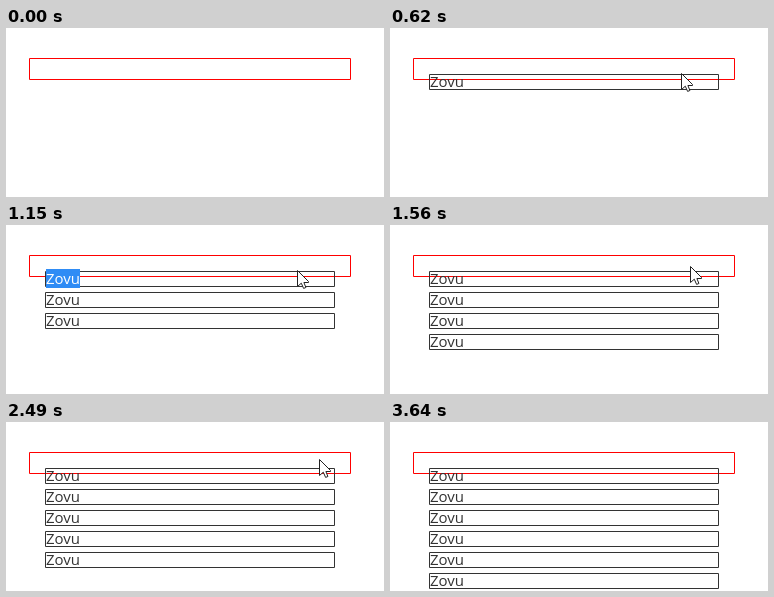
These frames come from a looping animation (378x169 px, 3870 ms). An HTML page with a canvas:

```html
<!DOCTYPE html>
<html lang="en">
<head>
<meta charset="utf-8">
<title>Click to add items</title>
<style>
  html, body { margin: 0; width: 100%; height: 100%; overflow: hidden; background: #fff; }
  canvas { display: block; }
</style>
</head>
<body>
<canvas id="stage" width="378" height="169"></canvas>
<script>
const ctx = document.getElementById('stage').getContext('2d');
const LOOP = 3870;
const POINTER_STEP = 75;
const LABEL = 'Zovu';
const INK = '#333';

// Each click adds an item; the second press also selects the first label.
const clickTimes = [620, 790, 1150, 1560, 2090, 2720];
const selection = { from: 690, to: clickTimes[3] };

const glides = [
  { start: 70, end: 370, from: [297, 116], to: [291, 45] },
  { start: 1245, end: 1395, from: [291, 45], to: [300, 41] },
  { start: 1640, end: 2400, from: [300, 41], to: [313, 37] },
  { start: 3330, end: 3900, from: [343, 71], to: [388, 190] }
];

const arrow = new Path2D('M.5 .5V16.5L4.3 13.2L6.6 18.4L8.9 17.5L6.9 12.5H11.5V11.5Z');
const easeOut = u => 1 - (1 - u) ** 3;

function outline(x, y, w, h, color) {
  ctx.strokeStyle = color;
  ctx.strokeRect(x + 0.5, y + 0.5, w - 1, h - 1);
}

function drawItem(y, selected) {
  outline(39, y, 290, 16, INK);
  if (selected) {
    ctx.fillStyle = '#2f8cf5';
    ctx.fillRect(40, y - 2, 34, 19);
  }
  ctx.fillStyle = selected ? '#fff' : INK;
  ctx.fillText(LABEL, 40, y + 13);
}

function drawPointer(t) {
  const glide = glides.findLast(g => g.start <= t);
  if (!glide) return;
  const { start, end, from, to } = glide;
  const elapsed = Math.floor((t - start) / POINTER_STEP) * POINTER_STEP;
  const progress = easeOut(Math.min(1, elapsed / (end - start)));
  const [x, y] = from.map((a, i) => Math.round(a + (to[i] - a) * progress));
  ctx.save();
  ctx.translate(x, y);
  ctx.fillStyle = '#fff';
  ctx.fill(arrow);
  ctx.strokeStyle = '#222';
  ctx.stroke(arrow);
  ctx.restore();
}

function draw(t) {
  ctx.fillStyle = '#fff';
  ctx.fillRect(0, 0, 378, 169);
  ctx.lineJoin = 'round';
  ctx.font = '15px "Open Sans", "Noto Sans", sans-serif';
  outline(23, 30, 322, 22, '#f00');
  clickTimes.forEach((time, i) => {
    const selected = i === 0 && t >= selection.from && t < selection.to;
    if (t >= time) drawItem(46 + 21 * i, selected);
  });
  drawPointer(t);
}

const begin = performance.now();
function tick() {
  draw((performance.now() - begin) % LOOP);
  requestAnimationFrame(tick);
}
tick();
</script>
</body>
</html>
```
